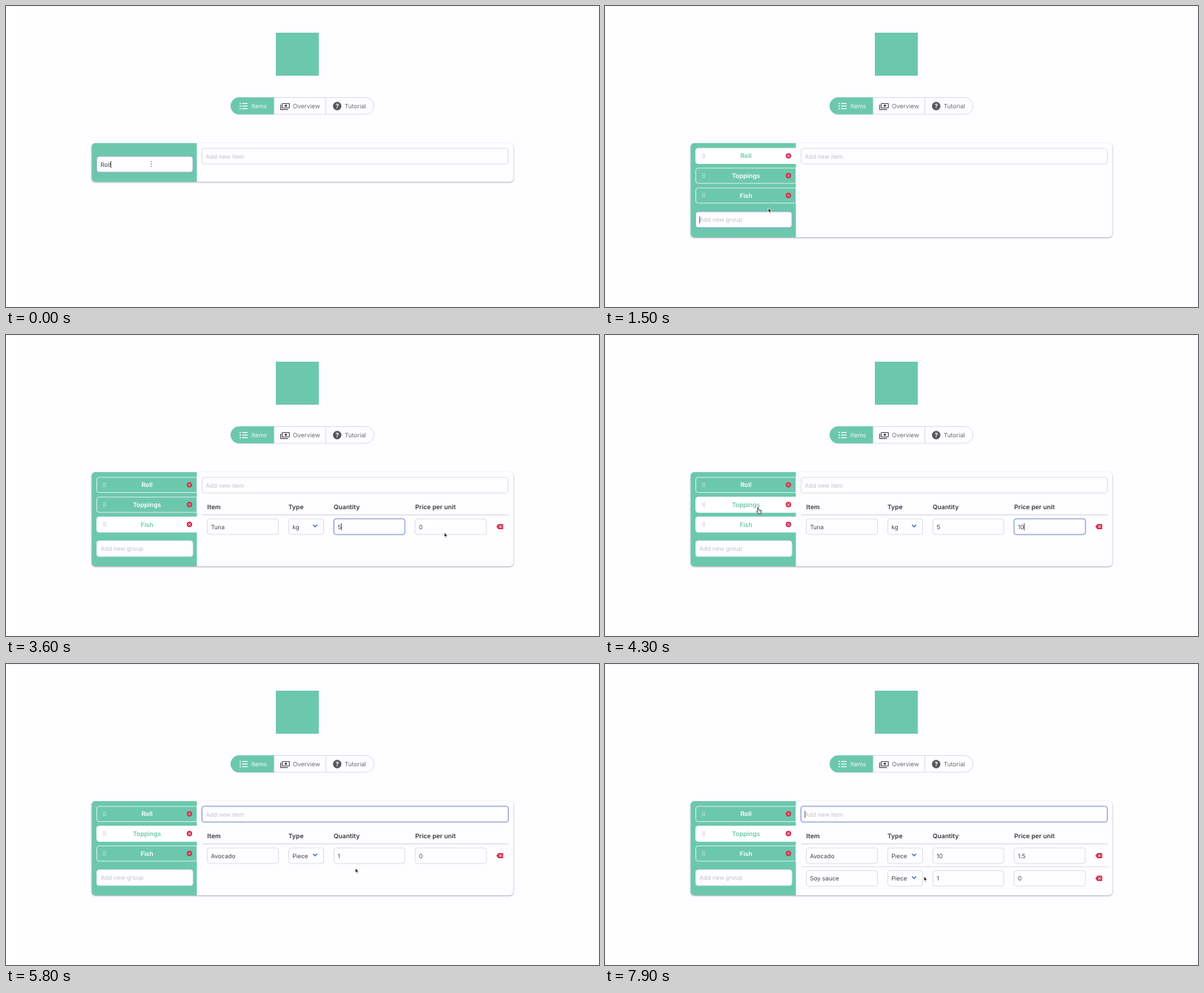
Recreate the animation shown at these times as an HTML page with a canvas. Size 800x406 px, loop 8 s.

```html
<!DOCTYPE html>
<html lang="en">
<head>
<meta charset="utf-8">
<title>Shopping groups</title>
<style>
  html, body { margin: 0; width: 100%; height: 100%; overflow: hidden; background: #fefdff; }
  canvas { display: block; width: 800px; height: 406px; }
</style>
</head>
<body>
<canvas id="stage" width="800" height="406"></canvas>
<script>
const ctx = document.getElementById('stage').getContext('2d');
ctx.textRendering = 'geometricPrecision';
const LOOP = 8000, STEP = 100;
const GREEN = '#6cc8ac', PAPER = '#fefdff', INK = '#434345', HINT = '#c3c3c8';
const LINE = '#dedee3', RED = '#d23452', BLUE = '#5167c8', ICON = '#55555a';
const GROUPS = ['Roll', 'Toppings', 'Fish'];
const GROUP_TOP = 191.5, GROUP_PITCH = 26.7;

// Pointer keys: time, centre x, centre y, shape from then on
const POINTER = [
  [0, 196, 213, 'beam'], [100, 196, 213, ''], [1500, 222, 276, 'arrow'],
  [1600, 203, 256, 'hand'], [1800, 203, 256, 'arrow'], [2000, 400, 204, 'beam'],
  [2100, 400, 204, ''], [2400, 406, 238, 'arrow'], [2500, 411, 269, 'hand'],
  [2800, 411, 269, 'arrow'], [3000, 408, 292, 'arrow'], [3200, 490, 260, 'beam'],
  [3500, 520, 263, 'arrow'], [3600, 593, 270, 'arrow'], [3700, 596, 262, 'beam'],
  [4000, 596, 262, 'arrow'], [4300, 208, 237, 'hand'], [4800, 208, 237, 'arrow'],
  [5100, 430, 204, 'beam'], [5200, 430, 204, ''], [5700, 452, 245, 'arrow'],
  [5800, 473, 279, 'arrow'], [6000, 484, 261, 'beam'], [6300, 484, 261, 'arrow'],
  [6500, 596, 261, 'beam'], [6800, 596, 261, 'arrow'], [7000, 440, 205, 'beam'],
  [7100, 440, 205, ''], [7600, 432, 290, 'arrow']
];

const FOCUS = [
  [0, 'group'], [1700, ''], [2000, 'add'], [2500, 'type'], [3200, 'quantity'],
  [3700, 'price'], [4800, ''], [5100, 'add'], [6000, 'quantity'], [6500, 'price'], [7000, 'add']
];

const pick = (t, keys) => keys.filter(k => k[0] <= t).pop()[1];

function typed(t, text, from, to) {
  if (t < from) return '';
  return text.slice(0, Math.ceil(text.length * Math.min(1, (t - from + STEP) / (to - from + STEP))));
}

function stateAt(t) {
  const groupCount = pick(t, [[0, 0], [100, 1], [700, 2], [1400, 3]]);
  const selected = pick(t, [[0, 0], [1700, 2], [4800, 1]]);
  let groupText = '', addText = '';
  if (t < 100) groupText = 'Roll';
  else if (t < 700) groupText = typed(t, 'Toppings', 200, 600);
  else if (t < 1400) groupText = typed(t, 'Fish', 1000, 1300);
  if (t < 2400) addText = typed(t, 'Tuna', 2100, 2300);
  else if (t >= 5200 && t < 5700) addText = typed(t, 'Avocado', 5200, 5600);
  else if (t >= 7100 && t < 7600) addText = typed(t, 'Soy sauce', 7100, 7500);

  const rows = [];
  if (t >= 2400 && t < 4800) rows.push({
    item: 'Tuna',
    type: t < 3000 ? 'Piece' : 'kg',
    quantity: pick(t, [[0, '1'], [3500, ''], [3600, '5']]),
    price: pick(t, [[0, '0'], [3800, ''], [3900, '1'], [4000, '10']])
  });
  if (t >= 5700) rows.push({
    item: 'Avocado',
    type: 'Piece',
    quantity: pick(t, [[0, '1'], [6100, ''], [6200, '1'], [6300, '10']]),
    price: pick(t, [[0, '0'], [6600, '1'], [6700, '1.'], [6800, '1.5']])
  });
  if (t >= 7600) rows.push({ item: 'Soy sauce', type: 'Piece', quantity: '1', price: '0' });

  return {
    groupCount, selected, groupText, addText, rows,
    hovered: pick(t, [[0, -1], [1600, 2], [1800, -1], [4300, 1], [4900, -1]]),
    focus: pick(t, FOCUS),
    lastFocus: pick(Math.max(0, t - STEP), FOCUS),
    caret: !(t >= 5800 && t < 6000)
  };
}

function box(x, y, w, h, r, fill, stroke, width = 1) {
  ctx.beginPath();
  ctx.roundRect(x, y, w, h, r);
  if (fill) { ctx.fillStyle = fill; ctx.fill(); }
  if (stroke) { ctx.strokeStyle = stroke; ctx.lineWidth = width; ctx.stroke(); }
}

function label(text, x, y, color = INK, size = 8, weight = 400, align = 'left') {
  ctx.font = `${weight} ${size}px Inter, "Open Sans", sans-serif`;
  ctx.textAlign = align;
  ctx.textBaseline = 'alphabetic';
  ctx.fillStyle = color;
  ctx.fillText(text, x, y + size * 0.36);
}

function path(points, color, width = 1, fill) {
  ctx.beginPath();
  points.forEach(([x, y]) => ctx.lineTo(x, y));
  if (fill) { ctx.closePath(); ctx.fillStyle = fill; ctx.fill(); }
  if (color) { ctx.strokeStyle = color; ctx.lineWidth = width; ctx.stroke(); }
}

function disc(x, y, r, fill) {
  ctx.beginPath();
  ctx.arc(x, y, r, 0, Math.PI * 2);
  ctx.fillStyle = fill;
  ctx.fill();
}

function cross(x, y, r, color) {
  path([[x - r, y - r], [x + r, y + r]], color);
  path([[x + r, y - r], [x - r, y + r]], color);
}

function field(x, y, w, text, { hint = '', focused, faded, caret, border = LINE, ring = '#8c9bd3' } = {}) {
  if (focused) box(x, y, w, 21, 3, null, 'rgba(81,103,200,.22)', 2.6);
  const stroke = focused ? ring : faded ? '#aeb8e0' : border;
  box(x, y, w, 21, 3, PAPER, stroke);
  label(text || hint, x + 5, y + 10.7, text ? INK : HINT);
  if (focused && caret) {
    const end = x + 5.3 + (text ? ctx.measureText(text).width : 0);
    path([[end, y + 6], [end, y + 15.5]], '#333', 0.8);
  }
}

function drawNav() {
  box(303.5, 123.5, 193, 22.5, 11.25, PAPER, LINE);
  box(303, 123.3, 58.6, 23, [11.5, 0, 0, 11.5], GREEN);
  path([[431.5, 124], [431.5, 146]], LINE);
  for (let i = 0; i < 3; i++) {
    const y = 131.5 + i * 3.5;
    disc(316, y, 0.9, '#fff');
    path([[318.5, y], [326, y]], '#fff', 1.2);
  }
  label('Items', 331, 135.4, '#f3fbf8', 8.2);

  box(372.7, 131.5, 9.6, 6, 0.5, null, ICON, 1.2);
  disc(377.5, 134.5, 1.7, ICON);
  path([[370.6, 133], [370.6, 139.6], [380.5, 139.6]], ICON, 1.2);
  label('Overview', 387, 135.4, '#69696d', 8.2);

  disc(446.8, 135, 5.7, ICON);
  label('?', 446.8, 135.2, '#fff', 8.5, 700, 'center');
  label('Tutorial', 457, 135.4, '#69696d', 8.2);
}

function drawGroup(name, index, active) {
  const y = GROUP_TOP + index * GROUP_PITCH, mid = y + 10.6;
  box(122.5, y + 0.5, 135, 20.5, [3, 0, 0, 3], active ? '#fff' : null,
    active ? '#fff' : 'rgba(255,255,255,.7)');
  for (let i = 0; i < 6; i++) {
    ctx.fillStyle = active ? '#c4c7ca' : 'rgba(255,255,255,.6)';
    ctx.fillRect(131.2 + (i % 2) * 2.3, mid - 3 + Math.floor(i / 2) * 2.3, 1.3, 1.3);
  }
  label(name, 190.2, mid, active ? GREEN : '#fff', 8.5, 600, 'center');
  disc(247.5, mid, 3.7, RED);
  cross(247.5, mid, 1.3, active ? '#fff' : '#a8cfc0');
}

function drawRow(row, y, live, s) {
  const mid = y + 10.5;
  const choosing = live && s.focus === 'type';
  const options = name => ({ focused: live && s.focus === name, caret: s.caret });
  field(271.5, y, 96, row.item);
  field(381.5, y, 47, row.type, { focused: choosing });
  path([[414.3, mid - 2.6], [417, mid + 0.2], [419.7, mid - 2.6]], choosing ? '#333' : BLUE, 1.4);
  field(442.5, y, 95.5, row.quantity, options('quantity'));
  field(552, y, 96, row.price, options('price'));
  path([[661.5, mid], [664.3, mid - 3.6], [670.7, mid - 3.6], [670.7, mid + 3.6], [664.3, mid + 3.6]],
    null, 0, RED);
  cross(667, mid, 1.5, '#fff');
}

function drawTable(s) {
  if (!s.rows.length) return;
  [['Item', 271.5], ['Type', 381], ['Quantity', 442], ['Price per unit', 552]]
    .forEach(([name, x]) => label(name, x, 231.5, '#38383b', 8.5, 600));
  path([[265, 242.7], [678, 242.7]], '#d3d3d8');
  s.rows.forEach((row, i) => {
    if (i) path([[265, 273.5], [678, 273.5]], LINE);
    drawRow(row, 248 + i * 30.7, i === 0, s);
  });
}

function drawPanel(s) {
  const inputY = s.groupCount ? 197.6 + s.groupCount * GROUP_PITCH : 203;
  const height = inputY + 34.2 - 185;
  ctx.save();
  ctx.shadowColor = 'rgba(0,0,0,.38)';
  ctx.shadowBlur = 2;
  ctx.shadowOffsetY = 0.8;
  box(115.5, 185, 569, height, 5, PAPER);
  ctx.restore();
  box(115.5, 185, 142, height, [5, 0, 0, 5], GREEN);

  for (let i = 0; i < s.groupCount; i++) {
    drawGroup(GROUPS[i], i, i === s.selected || i === s.hovered);
  }
  field(122.5, inputY, 129.5, s.groupText, {
    hint: 'Add new group', focused: s.focus === 'group', caret: s.caret,
    border: '#e9eeec', ring: '#b4c3e2'
  });
  field(264.5, 192, 413, s.addText, {
    hint: 'Add new item', focused: s.focus === 'add', faded: s.lastFocus === 'add', caret: s.caret
  });
  drawTable(s);
}

function drawPointer(t) {
  const i = POINTER.findLastIndex(k => k[0] <= t);
  const a = POINTER[i], b = POINTER[i + 1] || a;
  if (!a[3]) return;
  const u = b === a ? 0 : (t - a[0]) / (b[0] - a[0]);
  const ease = u * u * (3 - 2 * u);
  ctx.save();
  ctx.translate(a[1] + (b[1] - a[1]) * ease, a[2] + (b[2] - a[2]) * ease);
  if (a[3] === 'beam') {
    ctx.setLineDash([1.4, 1.6]);
    path([[0, -3.7], [0, 3.7]], '#555', 1);
  } else if (a[3] === 'hand') {
    path([[-2.3, -4], [-1, -4], [-0.7, -1.2], [2.8, -0.4], [3, 1.6], [2, 4], [-1.3, 4], [-3.4, 0.8], [-2, 0.8]],
      '#333', 0.9, '#fff');
    path([[0.3, 0], [0.3, 1.6]], '#555', 0.5);
    path([[1.6, 0], [1.6, 1.6]], '#555', 0.5);
  } else {
    path([[-1.8, -4], [-1.8, 2.8], [-0.3, 1.5], [0.8, 4], [2, 3.5], [0.9, 1.1], [2.9, 1]],
      '#fff', 0.8, '#222');
  }
  ctx.restore();
}

function draw() {
  const t = Math.floor((performance.now() % LOOP) / STEP) * STEP;
  ctx.fillStyle = PAPER;
  ctx.fillRect(0, 0, 800, 406);
  ctx.fillStyle = '#f6f5f8';
  ctx.fillRect(0, 0, 800, 1);
  box(364, 36, 58, 58, 0, GREEN);
  drawNav();
  drawPanel(stateAt(t));
  drawPointer(t);
  requestAnimationFrame(draw);
}
draw();
</script>
</body>
</html>
```
